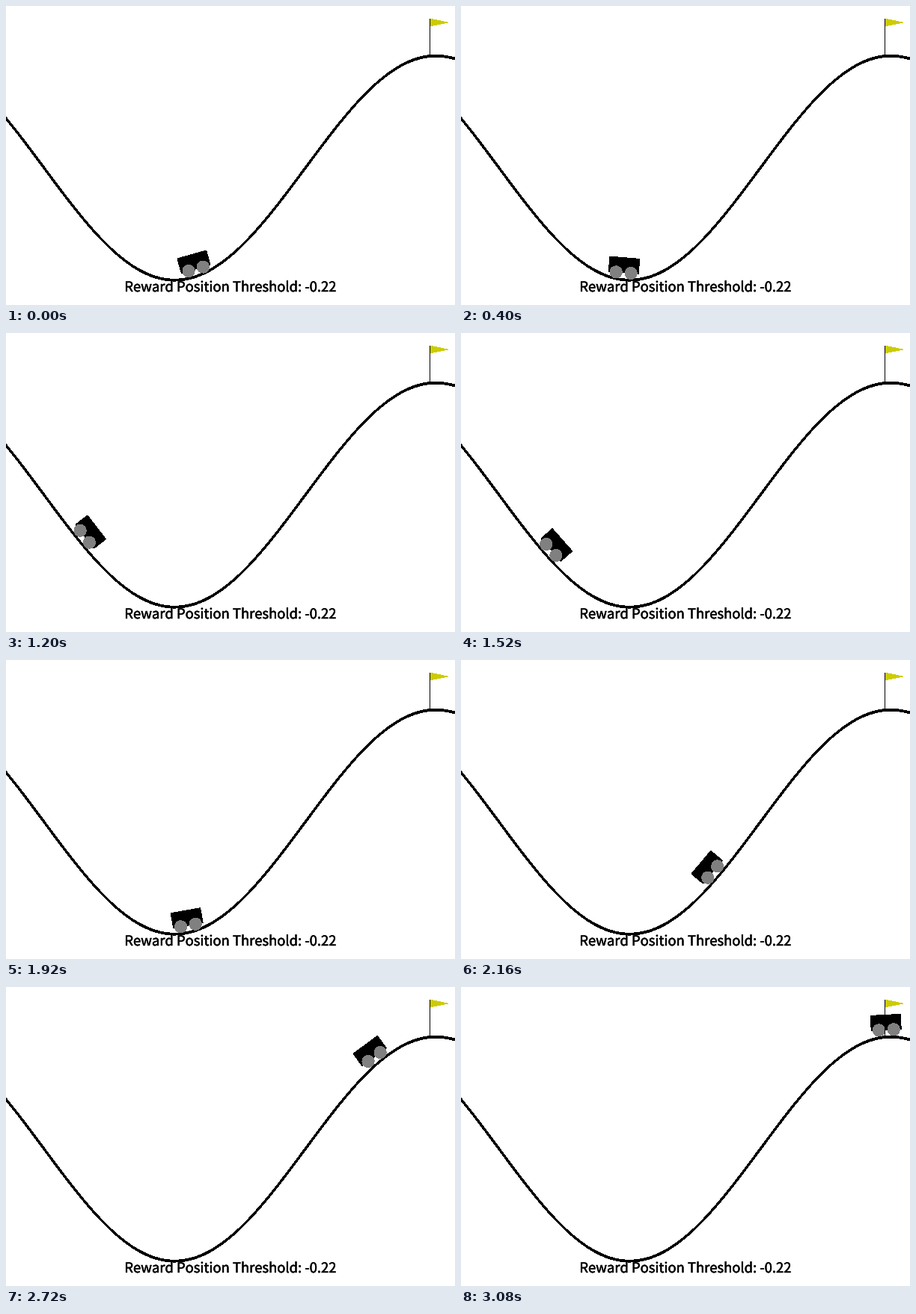
Recreate the animation shown at these times as a matplotlib script. Size 600 by 400 pixels, loop 3.12 s.

```python
import numpy as np
import matplotlib.pyplot as plt
from matplotlib import patheffects
from matplotlib.animation import FuncAnimation
from matplotlib.patches import Circle, Polygon
from matplotlib.transforms import Affine2D

W, H, DPI = 600, 400, 100
PX = 72 / DPI                      # points per pixel
FRAMES, INTERVAL = 78, 40
LEFT, RIGHT, GOAL = -1.2, 0.6, 0.5
SCALE = W / (RIGHT - LEFT)
STEPS = 91
COAST = {39, 47, 48}               # steps without engine push
CLEARANCE = 9.5


def hill(pos):
    return (np.sin(3 * pos) * 0.45 + 0.55) * SCALE


def to_x(pos):
    return (pos - LEFT) * SCALE


def drive(pos=-0.4313, vel=0.0):
    """Rock the car out of the valley by pushing along its velocity."""
    path = [pos]
    for step in range(STEPS):
        push = 0 if step in COAST else (1 if vel > 0 else -1)
        vel += 0.001 * push - 0.0025 * np.cos(3 * pos)
        pos += vel
        path.append(pos)
    return path


path = drive()

fig = plt.figure(figsize=(W / DPI, H / DPI), dpi=DPI, facecolor="white")
ax = fig.add_axes([0, 0, 1, 1])
ax.set(xlim=(0, W), ylim=(0, H))
ax.axis("off")

# Track, three pixels wide along the steeper axis
track = np.linspace(LEFT, RIGHT, 100)
half = 1.4 * np.maximum(1, np.abs(1.35 * np.cos(3 * track)))
ax.fill_between(to_x(track), hill(track) - half, hill(track) + half,
                color="black", lw=0, antialiased=False, zorder=1)

# Car
body = Polygon([(-20, CLEARANCE), (-20, CLEARANCE + 20),
                (20, CLEARANCE + 20), (20, CLEARANCE)], color="black")
wheels = [Circle((x, CLEARANCE), 8, color="0.5") for x in (10, -10)]
car = [body, *wheels]
for z, part in enumerate(car):
    part.set(lw=0, antialiased=False, zorder=2 + z)
    ax.add_patch(part)

# Flag
fx, fy = to_x(GOAL) - 0.5, hill(GOAL)
ax.plot([fx, fx], [fy, fy + 50], color="black", lw=PX,
        antialiased=False, solid_capstyle="butt", zorder=6)
ax.add_patch(Polygon([(fx, fy + 50), (fx, fy + 40), (fx + 24, fy + 45)],
                     fc=(0.8, 0.8, 0), lw=0, antialiased=False, zorder=5))

# Caption
caption = ax.text(W / 2, 18, "Reward Position Threshold: -0.22",
                  family="Noto Sans CJK JP", size=18.4 * PX, color="black",
                  ha="center", va="baseline", zorder=8)
caption.set_path_effects([patheffects.withStroke(linewidth=0.5 * PX,
                                                 foreground="black")])


def update(frame):
    pos = path[round(frame * STEPS / (FRAMES - 1))]
    pose = Affine2D().rotate(np.cos(3 * pos)).translate(to_x(pos), hill(pos))
    for part in car:
        part.set_transform(pose + ax.transData)
    return car


anim = FuncAnimation(fig, update, frames=FRAMES, interval=INTERVAL,
                     repeat=True, repeat_delay=0)
plt.show()
```
